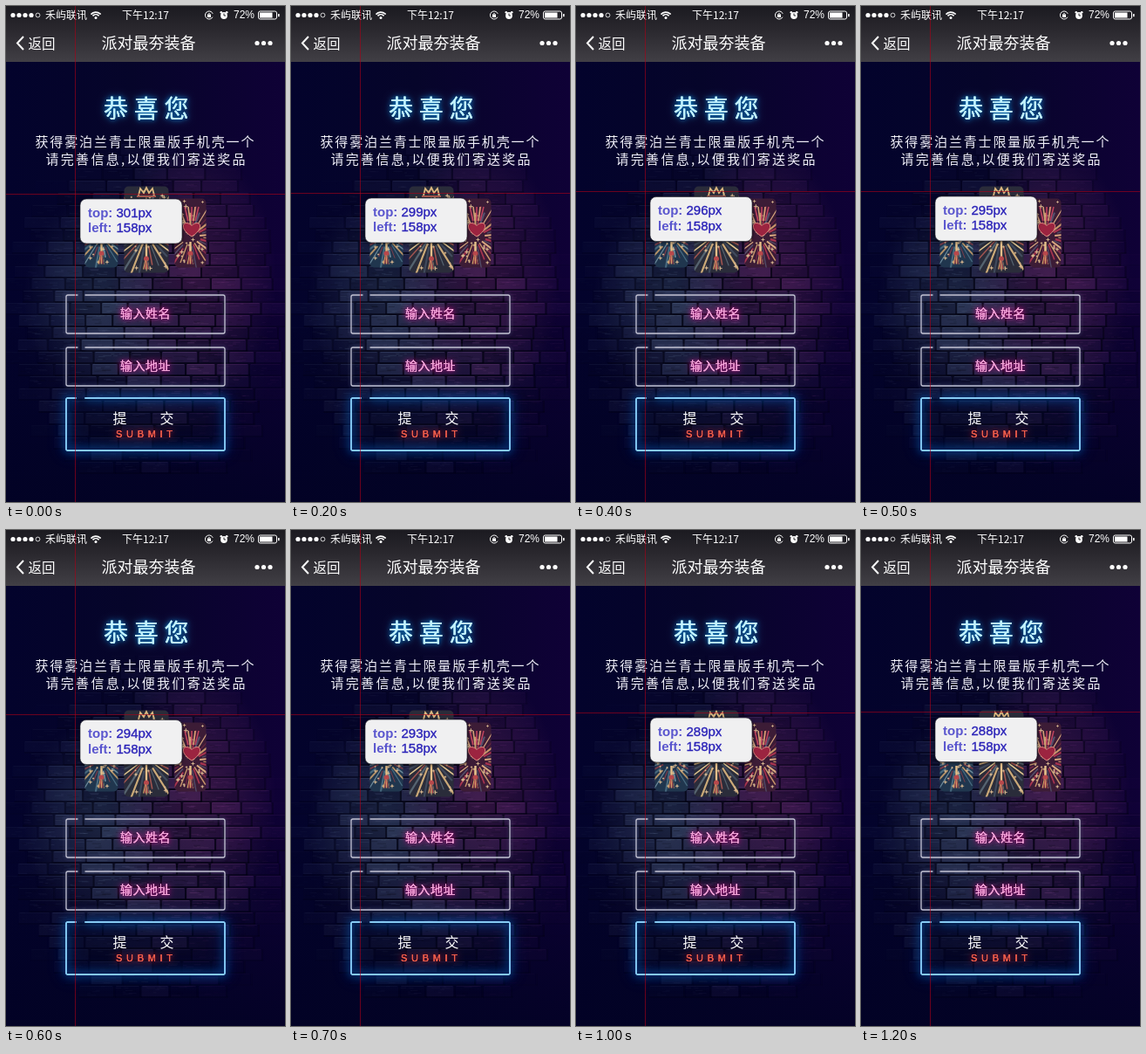
Recreate the animation shown at these times as an HTML page with a canvas. Size 320x568 px, loop 1.3 s.

```html
<!DOCTYPE html>
<html lang="zh">
<head>
<meta charset="utf-8">
<style>
html, body { margin: 0; width: 100%; height: 100%; overflow: hidden; background: #04042a; }
canvas { display: block; width: 320px; height: 568px; }
</style>
</head>
<body>
<canvas id="stage" width="320" height="568"></canvas>
<script>
const W = 320, H = 568, STEP = 100;
const TOPS = [301, 300, 299, 297, 296, 295, 294, 293, 292, 290, 289, 289, 288];
const LEFT = 158;
const CJK = '"Noto Sans CJK SC", "Noto Sans CJK", "Noto Sans CJK JP", sans-serif';
const LATIN = '"Liberation Sans", sans-serif';
const stage = document.getElementById('stage').getContext('2d');
const page = document.createElement('canvas');
page.width = W;
page.height = H;
const g = page.getContext('2d');

let seed = 7;
function rnd() {
  seed = (seed * 16807) % 2147483647;
  return seed / 2147483647;
}

function write(c, str, x, y, size, color, o = {}) {
  c.save();
  c.font = `${o.weight || 400} ${size}px ${o.family || CJK}`;
  c.fillStyle = c.strokeStyle = color;
  c.textAlign = o.align || 'left';
  c.textBaseline = o.base || 'middle';
  c.letterSpacing = (o.space || 0) + 'px';
  if (o.glow) {
    c.shadowColor = o.glow;
    for (const b of [10, 5]) {
      c.shadowBlur = b;
      c.fillText(str, x, y);
    }
    c.shadowBlur = 0;
  }
  c.fillText(str, x, y);
  if (o.stroke) {
    c.lineWidth = o.stroke;
    c.strokeText(str, x, y);
  }
  c.restore();
}

function dot(c, x, y, r, color) {
  c.fillStyle = color;
  c.beginPath();
  c.arc(x, y, r, 0, 7);
  c.fill();
}

function path(c, pts, color, width) {
  c.strokeStyle = color;
  c.lineWidth = width;
  c.beginPath();
  pts.forEach(([x, y], i) => i ? c.lineTo(x, y) : c.moveTo(x, y));
  c.stroke();
}

function box(c, x, y, w, h, r) {
  c.beginPath();
  c.roundRect(x, y, w, h, r);
}

function pool(x, y, rx, ry, rgb, a) {
  g.save();
  g.translate(x, y);
  g.scale(rx, ry);
  const f = g.createRadialGradient(0, 0, 0, 0, 0, 1);
  f.addColorStop(0, `rgba(${rgb},${a})`);
  f.addColorStop(0.5, `rgba(${rgb},${a * 0.55})`);
  f.addColorStop(1, `rgba(${rgb},0)`);
  g.fillStyle = f;
  g.fillRect(-1, -1, 2, 2);
  g.restore();
}

// Brick light fades away from the middle of the wall.
function light(x, y) {
  const dx = (x - 165) / 165, dy = (y - 350) / 215;
  return Math.max(0, 1 - dx * dx - dy * dy);
}

function brick(x, y, w) {
  const k = light(x + w / 2, y), v = rnd();
  const warm = Math.min(1, Math.max(0, (x - 110) / 110));
  const rgb = `${100 + warm * 40},${118 - warm * 48},${150 - warm * 8}`;
  g.fillStyle = v > 0.35 ? `rgba(${rgb},${(v - 0.2) * 0.3 * k})`
                         : `rgba(0,0,16,${(0.5 - v) * 0.5 * k})`;
  g.fillRect(x, y, w - 2, 12);
  for (let i = 0; i < 7; i++) {
    g.fillStyle = rnd() > 0.5 ? `rgba(${rgb},${0.2 * k})` : `rgba(0,0,14,${0.24 * k})`;
    g.fillRect(x + rnd() * (w - 12), y + rnd() * 11, 3 + rnd() * 8, 1);
  }
  g.fillStyle = `rgba(${rgb},${0.3 * k})`;
  g.fillRect(x + 1, y, w - 4, 1);
  g.fillStyle = `rgba(0,0,14,${0.8 * k})`;
  g.fillRect(x, y + 12, w, 2);
  g.fillRect(x + w - 2, y, 2, 13);
}

function wall() {
  const base = g.createLinearGradient(0, 64, W, 64);
  base.addColorStop(0, '#03032c');
  base.addColorStop(0.45, '#06052a');
  base.addColorStop(1, '#0f0136');
  g.fillStyle = base;
  g.fillRect(0, 64, W, H - 64);
  const fade = g.createLinearGradient(0, 330, 0, H);
  fade.addColorStop(0, 'rgba(2,2,36,0)');
  fade.addColorStop(1, 'rgba(2,2,36,.85)');
  g.fillStyle = fade;
  g.fillRect(0, 330, W, H - 330);
  pool(110, 335, 90, 120, '44,60,86', 0.65);
  pool(215, 310, 95, 150, '84,34,82', 0.62);
  pool(165, 410, 140, 110, '32,32,60', 0.4);
  for (let row = 0, y = 130; y < 534; row++, y += 14) {
    let x = -20 + (row % 2) * 19 - rnd() * 8;
    while (x < W) {
      const w = 30 + rnd() * 14;
      brick(x, y, w);
      x += w;
    }
  }
}

function statusBar() {
  const f = g.createLinearGradient(0, 0, 0, 64);
  f.addColorStop(0, '#1b1a20');
  f.addColorStop(0.4, '#29272d');
  f.addColorStop(1, '#413f45');
  g.fillStyle = f;
  g.fillRect(0, 0, W, 64);
  for (let i = 0; i < 4; i++) dot(g, 8 + i * 7, 10.5, 2.6, '#fff');
  g.strokeStyle = '#fff';
  g.lineWidth = 0.8;
  g.beginPath();
  g.arc(36.5, 10.5, 2.4, 0, 7);
  g.stroke();
  write(g, '禾屿联讯', 45, 10.5, 12, '#fff');

  g.lineWidth = 1.6;
  for (const r of [7.4, 4.7]) {
    g.beginPath();
    g.arc(103, 14.5, r, -Math.PI * 0.77, -Math.PI * 0.23);
    g.stroke();
  }
  dot(g, 103, 13.5, 1.5, '#fff');
  write(g, '下午12:17', 160, 10.5, 12, '#fff', { align: 'center', weight: 500 });

  g.lineWidth = 1;
  g.beginPath();
  g.arc(233, 10.5, 4.5, 0.5, 5.9);
  g.stroke();
  g.fillStyle = '#fff';
  g.fillRect(231, 10, 4, 3);
  g.beginPath();
  g.arc(233, 10, 1.3, Math.PI, 0);
  g.stroke();

  dot(g, 250, 11, 3.9, '#fff');
  dot(g, 246.8, 7.2, 1.3, '#fff');
  dot(g, 253.2, 7.2, 1.3, '#fff');
  path(g, [[250, 8.5], [250, 11], [252, 11]], '#26262a', 1);
  write(g, '72%', 261, 11, 12, '#fff', { family: LATIN });
  g.strokeStyle = '#fff';
  g.lineWidth = 1;
  box(g, 289.5, 6, 21, 9, 2);
  g.stroke();
  g.fillStyle = '#fff';
  g.fillRect(291, 7.5, 14.5, 6);
  g.fillRect(312, 9, 1.6, 3.2);
}

function navBar() {
  path(g, [[20, 35], [13, 42.5], [20, 50]], '#fff', 2);
  write(g, '返回', 25.5, 43, 15.5, '#fff');
  write(g, '派对最夯装备', 163.5, 42.5, 18, '#fff', { align: 'center' });
  for (const x of [288, 295.5, 303]) dot(g, x, 42.5, 2.6, '#fff');
}

function star(x, y, r, color) {
  path(g, [[x - r, y], [x + r, y]], color, 0.8);
  path(g, [[x, y - r], [x, y + r]], color, 0.8);
  dot(g, x, y, r * 0.45, color);
}

function heart(x, y, s) {
  g.beginPath();
  g.moveTo(x, y + s);
  g.bezierCurveTo(x - s * 1.8, y - s * 0.1, x - s, y - s * 1.3, x, y - s * 0.4);
  g.bezierCurveTo(x + s, y - s * 1.3, x + s * 1.8, y - s * 0.1, x, y + s);
  g.fillStyle = '#9c2440';
  g.fill();
  g.strokeStyle = '#e08a80';
  g.lineWidth = 1;
  g.stroke();
}

function phoneCase(x, y, w, h, body, hues, edge) {
  const cx = x + w / 2, cy = y + h * 0.55;
  g.save();
  box(g, x, y, w, h, 5);
  g.fillStyle = body;
  g.fill();
  g.save();
  g.clip();
  for (let i = 0; i < 34; i++) {
    const a = i / 34 * Math.PI * 2 + 0.09, r = 8 + rnd() * 8, len = h * (0.3 + rnd() * 0.3);
    const c = Math.cos(a), s = Math.sin(a);
    path(g, [[cx + c * r, cy + s * r], [cx + c * len, cy + s * len]],
      hues[i % hues.length], 0.8 + rnd() * 1.5);
  }
  for (let i = 0; i < 26; i++)
    star(x + 3 + rnd() * (w - 6), y + 3 + rnd() * (h - 6), 1 + rnd() * 1.6, '#d8b890');
  // tassel
  path(g, [[cx, cy + 6], [cx, y + h - 17]], '#e6c08a', 2.4);
  dot(g, cx, y + h - 16, 3, '#b8484c');
  for (let i = -2; i < 3; i++)
    path(g, [[cx + i * 0.6, y + h - 14], [cx + i * 1.7, y + h - 4]], i % 2 ? '#a8404a' : '#d0a068', 1.2);
  g.restore();
  g.strokeStyle = edge;
  g.lineWidth = 1;
  g.stroke();
  g.restore();
}

function cases() {
  phoneCase(90.5, 220.5, 38, 79, '#20364e', ['#b89468', '#46687e', '#7c3c4a', '#6c8a9c'], '#2c3c54');
  phoneCase(193.5, 220.5, 36, 79, '#3c1c36', ['#c8966c', '#a83450', '#54506c', '#d8a880', '#7c2848'], '#4a2a48');
  for (let i = -2; i < 3; i++)
    path(g, [[213 + i * 2, 246], [213 + i * 4, 230]], i % 2 ? '#d0a074' : '#c04460', 1.6);
  heart(213, 255, 9);
  phoneCase(135.5, 206.5, 51, 99, '#2a2c3a', ['#ccaa78', '#566470', '#a05450', '#e2c690', '#404a5c'], '#44465a');
  path(g, [[152, 217], [154, 209], [158, 214], [161, 208], [164, 214], [168, 209], [170, 217]], '#dcb880', 1.8);
  path(g, [[150, 218], [172, 218]], '#a85a50', 2);
}

function outline(x, y, w, h, color, glow, blurs, gap) {
  const r = x + w, b = y + h, k = 2;
  g.save();
  g.lineCap = 'round';
  g.strokeStyle = color;
  g.shadowColor = glow;
  g.lineWidth = 1.3;
  for (const blur of blurs) {
    g.shadowBlur = blur;
    g.beginPath();
    g.moveTo(gap[1], y);
    g.arcTo(r, y, r, b, k);
    g.arcTo(r, b, x, b, k);
    g.arcTo(x, b, x, y, k);
    g.arcTo(x, y, r, y, k);
    g.lineTo(gap[0], y);
    g.stroke();
  }
  g.restore();
}

function form() {
  write(g, '恭喜您', 112, 117, 28, '#c2f2ff', { space: 6.8, glow: '#0c7cc4' });
  write(g, '获得雾泊兰青士限量版手机壳一个', 33.5, 155, 15, '#f0f0f8', { space: 1.85, weight: 500 });
  write(g, '请完善信息,以便我们寄送奖品', 45.5, 175.5, 15, '#f0f0f8', { space: 2.3, weight: 500 });
  cases();
  [['输入姓名', 331], ['输入地址', 391]].forEach(([label, y]) => {
    outline(69, y, 182, 44, '#c4c4d4', '#50547c', [4], [82, 91]);
    write(g, label, 131, y + 21, 14, '#f2a4d8', { space: 0.5, glow: '#b8107c' });
  });
  g.fillStyle = 'rgba(4,8,36,.35)';
  g.fillRect(69, 449, 182, 60);
  outline(69, 449, 182, 60, '#8cd0f8', '#0a70d8', [18, 12, 8], [80, 91]);
  write(g, '提', 122.5, 472, 16, '#fff', { weight: 500 });
  write(g, '交', 176.5, 472, 16, '#fff', { weight: 500 });
  write(g, 'SUBMIT', 126, 490.5, 11, '#f2604c', { space: 4.7, glow: '#a01420', family: LATIN });
}

function tip(c, x, y, top) {
  c.save();
  c.shadowColor = 'rgba(0,0,0,.6)';
  c.shadowBlur = 4;
  c.shadowOffsetY = 1;
  c.fillStyle = '#f0f0f1';
  box(c, x, y, 117, 51, 7);
  c.fill();
  c.restore();
  c.strokeStyle = 'rgba(30,30,40,.6)';
  c.lineWidth = 1;
  c.stroke();
  [['top:', top, 20.5], ['left:', LEFT, 38]].forEach(([name, v, dy]) => {
    const o = { family: LATIN, base: 'alphabetic' };
    write(c, name, x + 9, y + dy, 15, '#5a56ce', { ...o, weight: 700 });
    write(c, v + 'px', x + 41.5, y + dy, 15, '#2a22b8', { ...o, stroke: 0.35 });
  });
}

function draw(now) {
  const top = TOPS[Math.floor(now / STEP) % TOPS.length];
  const x = LEFT / 2, y = 64 + top / 2;
  stage.drawImage(page, 0, 0);
  stage.fillStyle = 'rgba(170,0,24,.62)';
  stage.fillRect(x, 0, 1, H);
  stage.fillRect(0, Math.round(y), W, 1);
  tip(stage, x + 6, y + 6.5, top);
}

function loop() {
  draw(performance.now() - start);
  requestAnimationFrame(loop);
}

wall();
statusBar();
navBar();
form();
const start = performance.now();
loop();
</script>
</body>
</html>
```
